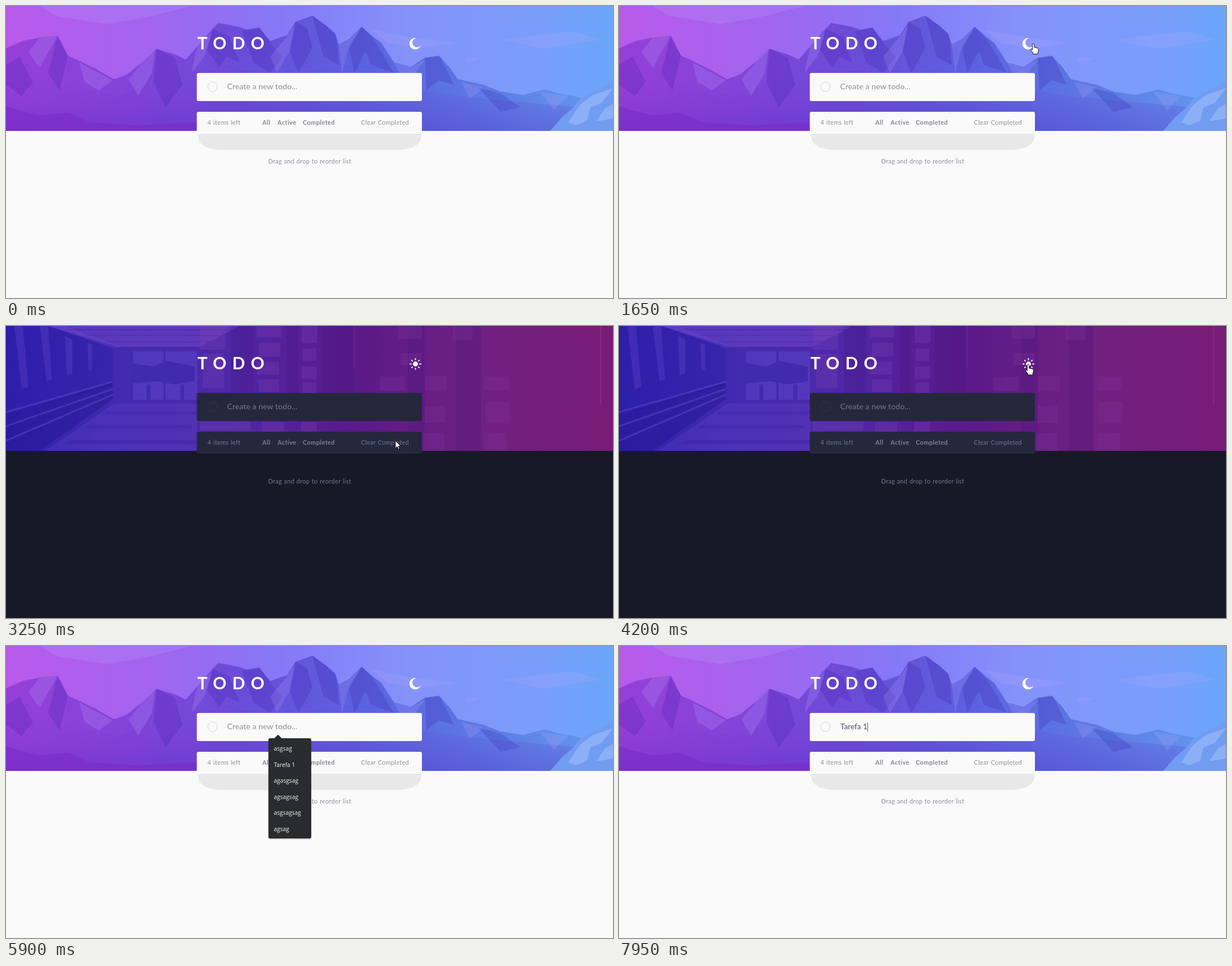
An HTML page for the animation above (8000 ms loop, 1080 px wide and 519 px high).

```html
<!DOCTYPE html>
<html lang="en">
<head>
<meta charset="utf-8">
<title>Todo</title>
<style>
  html, body { margin: 0; width: 100%; height: 100%; overflow: hidden; }
  svg { display: block; width: 100%; height: 100%; }
  #stage {
    --page: #fafafa; --card: #fafafa; --ring: #d6d6dc;
    --hint: #8c8d9b; --label: #8f909d; --filter: #858695; --typed: #484b6a;
  }
  #stage.dark {
    --page: #181926; --card: #25273c; --ring: #34364c;
    --hint: #77798f; --label: #74779a; --filter: #7f819c;
  }
  .day, .night { display: none; }
  #stage:not(.dark) .day, #stage.dark .night { display: inline; }
  .page { fill: var(--page); }
  .card { fill: var(--card); }
  .ring { fill: none; stroke: var(--ring); }
  text { font-family: Lato, sans-serif; white-space: pre; }
  .title { font-size: 30px; font-weight: 700; letter-spacing: 10.2px; fill: #fff; }
  .field { font-size: 14px; letter-spacing: .1px; fill: var(--hint); }
  .typed { font-size: 13.6px; fill: var(--typed); }
  .label { font-size: 11px; letter-spacing: .28px; word-spacing: .5px; fill: var(--label); }
  .filter { font-size: 11px; font-weight: 700; letter-spacing: .4px; fill: var(--filter); }
  #menu text { font: 10.2px "Open Sans", sans-serif; fill: #f4f4f4; }
  #menu rect, #menu path { fill: #2a2b2e; }
  #menu { filter: drop-shadow(0 1px 1px #0005); }
  .pointer path { fill: #fff; stroke: #111; stroke-linejoin: round; }
  .shade { fill: #3414a4; opacity: .2; }
  .lit { fill: #b9a4ff; opacity: .2; }
</style>
</head>
<body>
<svg id="stage" viewBox="0 0 1080 519" preserveAspectRatio="none">
  <defs>
    <linearGradient id="sky">
      <stop offset="0" stop-color="#b95aeb"/><stop offset=".24" stop-color="#a264ee"/>
      <stop offset=".45" stop-color="#8578f7"/><stop offset=".66" stop-color="#8492fa"/>
      <stop offset=".88" stop-color="#7a9efa"/><stop offset="1" stop-color="#69a6f9"/>
    </linearGradient>
    <linearGradient id="rock">
      <stop offset="0" stop-color="#9540d8"/><stop offset=".22" stop-color="#8244d9"/>
      <stop offset=".4" stop-color="#6b4cd7"/><stop offset=".6" stop-color="#5c60de"/>
      <stop offset=".8" stop-color="#5c77e3"/><stop offset="1" stop-color="#6293ec"/>
    </linearGradient>
    <linearGradient id="hall">
      <stop offset="0" stop-color="#3020ad"/><stop offset=".2" stop-color="#432bb0"/>
      <stop offset=".36" stop-color="#4e28a8"/><stop offset=".47" stop-color="#561f98"/>
      <stop offset=".58" stop-color="#5b1a88"/><stop offset=".78" stop-color="#702080"/>
      <stop offset="1" stop-color="#791c77"/>
    </linearGradient>
    <linearGradient id="depth" x2="0" y2="1">
      <stop offset="0" stop-color="#7a30d0" stop-opacity="0"/>
      <stop offset="1" stop-color="#5120c0" stop-opacity=".3"/>
    </linearGradient>
  </defs>

  <rect class="page" width="1080" height="519"/>

  <g class="day">
    <rect width="1080" height="222" fill="url(#sky)"/>
    <path class="lit" d="M60 0H330L250 20 180 32 90 18zM650 42L720 55 800 66 740 75 680 66zM880 60L1010 45 1060 60 960 76zM820 92h22l-10 7h-18z"/>
    <path fill="url(#rock)" d="M0 75L30 62 60 56 92 53 110 88 130 97 160 112 192 130 215 122 245 98 268 76 300 86 320 95 340 72 368 40 378 30 410 36 430 42 450 38 470 62 500 52 515 28 545 17 570 35 585 48 592 68 610 58 633 37 655 56 668 66 690 100 720 108 745 92 770 88 790 110 804 130 850 140 880 152 920 158 960 148 985 156 1010 160 1030 165V222H0z"/>
    <path fill="url(#depth)" d="M0 130L60 120 130 145 200 160 280 130 370 120 460 150 560 120 690 140 800 160 1020 180V222H0z"/>
    <path class="shade" d="M92 53L110 88 95 150 75 120zM0 105L24 90 48 135 28 160 0 140zM268 76L300 92 314 140 284 180 262 135zM368 40L398 55 415 100 392 90 380 110 358 78zM420 45L452 39 470 65 492 90 470 119 440 100zM515 28L536 40 545 75 520 119 505 80zM545 17L570 35 588 52 592 105 565 90zM633 37L655 60 690 119 650 105 640 80 620 119 610 72zM745 92L772 90 797 140 770 132 748 150zM840 145L880 155 915 180 880 188z"/>
    <path class="lit" d="M60 56L92 53 74 85 60 110 40 82zM130 100L190 132 165 150 140 135zM245 98L266 78 259 120 235 160 218 130zM340 72L366 46 354 88 330 119zM500 54L514 34 504 82 482 119 470 90zM592 68L630 42 608 80 598 119zM690 100L720 108 746 95 728 119 700 119zM810 135L850 145 825 165zM950 152L1000 160 975 185z"/>
    <path fill="#7c2bc9" opacity=".65" d="M0 178L24 186 60 194 110 190 150 207 230 212 340 207V222H0z"/>
    <path fill="#719cf2" d="M968 222L990 197 1008 182 1022 165 1046 151 1080 134V222z"/>
    <path fill="#a9c4fb" opacity=".5" d="M1000 207L1022 175 1045 158 1080 146 1060 172 1040 180 1034 204 1015 212zM1050 205L1066 182 1080 174V200z"/>
    <path fill="#fff" d="M730 57.1A8.2 8.2 0 1 0 737.5 70.5 10.2 10.2 0 1 1 730 57.1z"/>
  </g>

  <g class="night">
    <rect width="1080" height="222" fill="url(#hall)"/>
    <!-- ceiling -->
    <path fill="#8452cf" opacity=".38" d="M75 0H415L345 37H200z"/>
    <path fill="none" stroke="#3d22a2" stroke-width="3" opacity=".3" d="M105 7H402M140 17H382M175 28H362"/>
    <!-- left wall and its posts -->
    <path fill="#2a1ba4" opacity=".35" d="M0 0H75L190 40V105L0 160z"/>
    <path fill="#6f50cf" opacity=".28" d="M15 0H30L40 108 28 112zM60 0H75L82 95 72 98zM105 18L118 24V84L108 87zM145 30L153 33V78L147 80zM75 0H105L205 38H190z"/>
    <!-- far window -->
    <path fill="#5d47cc" opacity=".5" d="M222 45H340V131H222z"/>
    <path fill="#3422a0" opacity=".55" d="M226 66L262 72 285 62 336 72V98L300 104 270 98 226 102zM222 45h4v86h-4zM250 104h7v27h-7zM280 45h4v86h-4zM310 104h7v27h-7z"/>
    <!-- floor -->
    <path fill="#6746ca" opacity=".28" d="M192 138H340V222H70z"/>
    <path fill="#3421a0" opacity=".35" d="M180 152H340V157H172zM148 176H330V182H140zM115 203H340V210H105z"/>
    <!-- railing -->
    <path fill="#24168f" opacity=".45" d="M0 158L190 100V130L60 222H0z"/>
    <path fill="none" stroke="#6754d0" stroke-width="3" opacity=".4" d="M0 153L190 99M0 178L190 112M0 204L190 122"/>
    <!-- columns and brickwork -->
    <path fill="#421778" opacity=".25" d="M400 0H440V119H400zM500 0H520V119H500zM562 0H618V119H562zM715 0H745V222H715zM800 0H845V222H800z"/>
    <path fill="#7a3fb4" opacity=".3" d="M345 0h45v42h-45zM350 50h38v60h-38zM446 0h44v20h-44zM450 30h38v24h-38zM446 64h40v22h-40zM450 95h36v22h-36zM526 0h28v30h-28zM528 40h24v22h-24zM526 72h27v22h-27zM528 100h24v19h-24zM345 170h90v16h-90zM455 171h40v16h-40zM525 171h28v16h-28z"/>
    <path fill="#7a3298" opacity=".3" d="M618 0h3v75h-3zM666 90h44v25h-44zM698 0h42v23h-42zM702 48h38v22h-38zM745 89h39v27h-39zM745 142h36v30h-36zM742 190h38v32h-38zM795 0h35v25h-35zM850 90h45v24h-45zM853 135h43v38h-43zM850 190h42v32h-42z"/>
    <path fill="#a03488" opacity=".5" d="M1057 0h2v140h-2z"/>
    <g transform="translate(728.5 67.5)" fill="#fff" stroke="#fff" stroke-width="1.8">
      <circle r="3.5"/>
      <path id="rays" d="M0-10.2v3.2M0 10.2v-3.2M-10.2 0h3.2M10.2 0h-3.2"/>
      <use href="#rays" transform="rotate(45)"/>
    </g>
  </g>

  <text class="title" x="340.5" y="77">TODO</text>
  <rect class="card" x="339.5" y="119" width="400.5" height="50" rx="3"/>
  <circle class="ring" cx="367.5" cy="143.5" r="8.5"/>
  <text id="hint" class="field" x="393.5" y="148">Create a new todo...</text>
  <text id="typed" class="typed" x="394" y="148"></text>
  <rect id="caret" y="136" width="1" height="16" fill="#484b6a"/>

  <path class="day" fill="#e8e8e8" d="M341.5 226H739V229C739 248 722 256 690 256H390C358 256 341.5 248 341.5 229z"/>
  <path class="card day" d="M339.5 227V191q0-3 3-3H737q3 0 3 3V227z"/>
  <rect class="card night" x="339.5" y="188" width="400.5" height="39" rx="3"/>
  <text class="label" x="358.5" y="211">4 items left</text>
  <text class="filter" x="456" y="211">All</text>
  <text class="filter" x="483" y="211">Active</text>
  <text class="filter" x="528" y="211">Completed</text>
  <text class="label" x="631.5" y="211">Clear Completed</text>
  <text class="label" x="466.5" y="280">Drag and drop to reorder list</text>

  <g id="menu">
    <path d="M476.5 165L484 157.5 491.5 165z"/>
    <rect id="panel" x="467" y="164" rx="3"/>
    <g id="rows"></g>
  </g>

  <g id="pointer" class="pointer">
    <path id="arrow" d="M.5.5V14L3.7 11 6 15.8 8 14.9 5.8 10.3H10z"/>
    <path id="hand" d="M-2 11V1.6A1.6 1.6 0 0 1 1.3 1.6V6.3L7 7.7Q8.9 8.2 8.9 10V13L7.8 16V18.4H-.8V16.3L-4.8 11.3Q-5.3 9.4-3.6 9.4z"/>
    <path id="beam" style="fill:none" d="M-3 .5H-1L0 1.5 1 .5H3M0 1.5V14.5M-3 15.5H-1L0 14.5 1 15.5H3"/>
  </g>
</svg>
<script>
  const LOOP = 8000, STEP = 50, ROW = 28.5;
  const $ = id => document.getElementById(id);
  const show = (id, on) => { $(id).style.display = on ? '' : 'none'; };

  // time, x, y of the pointer's hot spot
  const path = [
    [250, 42, 0], [600, 230, 18], [900, 551, 48], [1100, 502, 59],
    [1300, 590, 124], [1450, 680, 112], [1600, 734, 72], [1650, 737.5, 67],
    [2850, 737.5, 67], [3050, 757, 120], [3350, 660, 245], [3700, 480, 264],
    [3750, 560, 205], [3850, 733, 70], [4050, 733, 70], [4200, 728.3, 68.5],
    [4800, 728.3, 68.5], [5000, 660, 105], [5250, 510, 134], [5400, 483, 136]
  ];
  const typing = [[0, ''], [6400, 'T'], [6600, 'Ta'], [6750, 'Tar'], [6850, 'Tare'],
    [7050, 'Taref'], [7100, 'Tarefa'], [7550, 'Tarefa '], [7750, 'Tarefa 1']];
  const recent = ['asgsag', 'Tarefa 1', 'agasgsag', 'agsagsag', 'asgsagsag', 'agsag'];
  const matches = ['Tarefa 1', 'Tarefa 2', 'Tarde', 'Teste'];
  const menus = [[0, []], [5400, recent], [6400, matches], [6600, matches.slice(0, 3)],
    [7050, matches.slice(0, 2)], [7550, matches.slice(0, 1)], [7800, []]];

  const latest = (list, t) => list.filter(([start]) => start <= t).pop();

  function pointerAt(t) {
    const next = path.findIndex(p => p[0] > t);
    if (next < 1) return path[path.length - 1].slice(1);
    const [a, b] = [path[next - 1], path[next]];
    const k = (t - a[0]) / (b[0] - a[0]);
    return [a[1] + (b[1] - a[1]) * k, a[2] + (b[2] - a[2]) * k];
  }

  function drawPointer(t) {
    const visible = t >= 300 && t < 5500;
    show('pointer', visible);
    if (!visible) return;
    const [x, y] = pointerAt(t);
    const within = (l, top, r, b) => x >= l && x <= r && y >= top && y <= b;
    const hand = within(717, 56, 739, 78);
    const beam = within(385, 119, 740, 169);
    show('hand', hand);
    show('beam', beam);
    show('arrow', !hand && !beam);
    $('pointer').setAttribute('transform', `translate(${x} ${y})`);
  }

  function drawField(t) {
    const [since, text] = latest(typing, t);
    $('typed').textContent = text;
    show('hint', !text);
    const blinkStart = Math.max(since, 5400);
    show('caret', t >= 5400 && Math.floor((t - blinkStart) / 500) % 2 === 0);
    $('caret').setAttribute('x', text ? 394 + $('typed').getComputedTextLength() : 394);
  }

  function drawMenu(t) {
    const items = latest(menus, t)[1];
    show('menu', items.length);
    $('panel').setAttribute('width', items === recent ? 76 : 66);
    $('panel').setAttribute('height', 7 + ROW * items.length);
    $('rows').innerHTML = items.map((item, i) =>
      `<text x="476.5" y="${186 + ROW * i}">${item}</text>`).join('');
  }

  function render(t) {
    $('stage').classList.toggle('dark', t >= 2100 && t < 4550);
    drawPointer(t);
    drawField(t);
    drawMenu(t);
  }

  const start = performance.now();
  function tick() {
    const t = (performance.now() - start) % LOOP;
    render(Math.floor(t / STEP) * STEP);
    requestAnimationFrame(tick);
  }
  tick();
</script>
</body>
</html>
```
